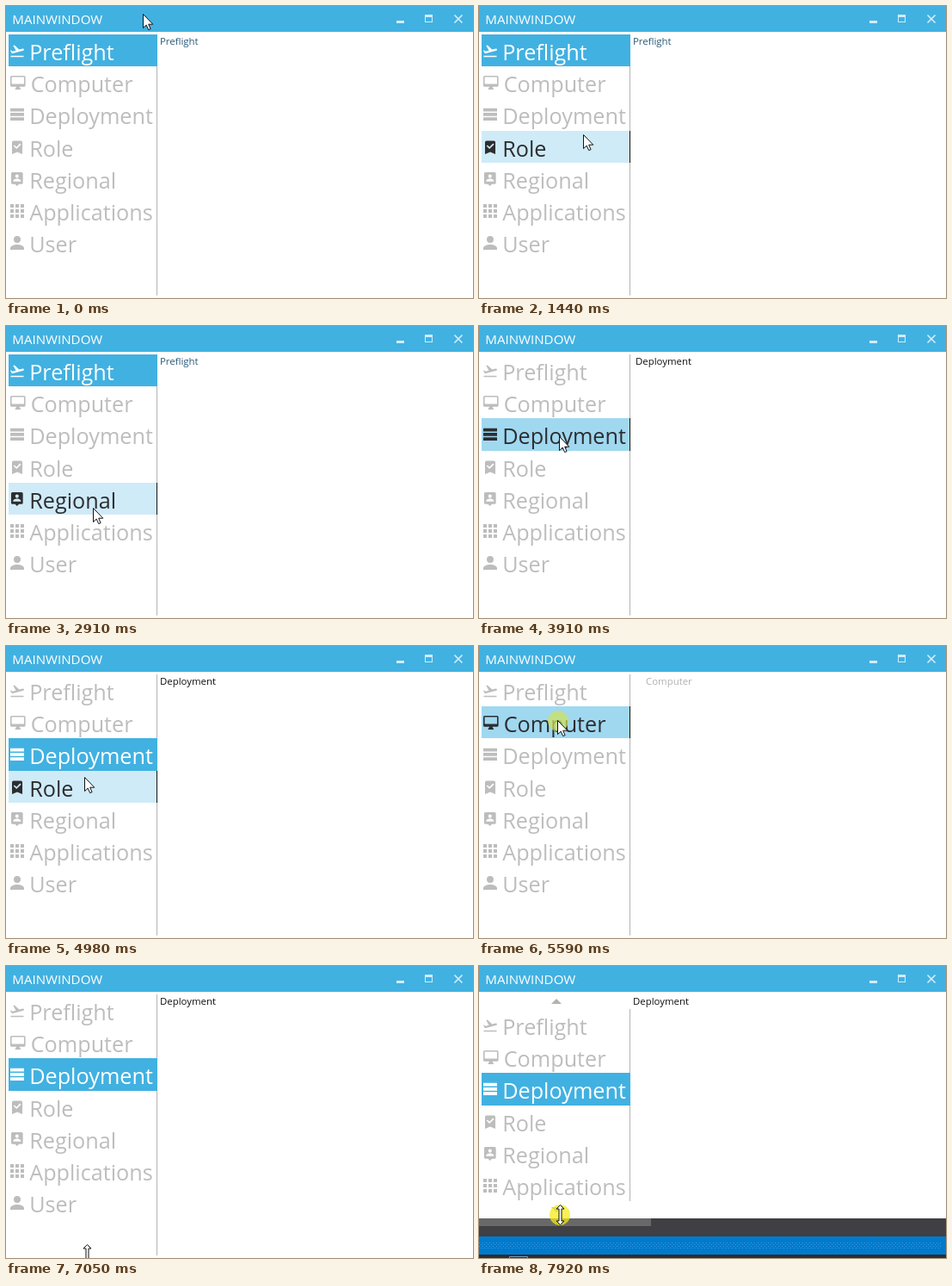
An HTML page for the animation above (7990 ms loop, 543 px wide and 339 px high).

```html
<!DOCTYPE html>
<html lang="en">
<head>
<meta charset="utf-8">
<title>Main window</title>
<style>
  html, body { margin: 0; width: 100%; height: 100%; overflow: hidden; background: #fff; }
  svg { display: block; width: 543px; height: 339px; }
  text { font-family: "Open Sans", "Noto Sans", sans-serif; white-space: pre; }
  rect { shape-rendering: crispEdges; }
  .row { fill: #bdbdbd; font-size: 25.2px; font-weight: 440; }
  .row .back, .row .edge { fill: none; }
  .row.hover { fill: #2d2d30; }
  .row.hover .back { fill: #cfebf7; }
  .row.hover .edge { fill: #111; }
  .row.on { fill: #fff; }
  .row.on .back { fill: #41b1e1; }
  .row.on.hover { fill: #2d2d30; }
  .row.on.hover .back { fill: #a0d8f0; }
  #label { font-size: 11.4px; }
</style>
</head>
<body>
<svg viewBox="0 0 543 339">
  <defs>
    <clipPath id="view"><rect id="viewBox" x="0" y="33" width="180" height="303"/></clipPath>
    <pattern id="grip" width="4" height="4" patternUnits="userSpaceOnUse">
      <path d="M0 1h1v1h-1zM2 3h1v1h-1z" fill="#5fb0e8" opacity=".6"/>
    </pattern>
  </defs>

  <g id="desktop">
    <rect y="290" width="543" height="25" fill="#3f3f44"/>
    <rect y="290" width="200" height="12" fill="#686868"/>
    <rect y="314" width="543" height="21" fill="#007acc"/>
    <rect y="321" width="537" height="7" fill="url(#grip)"/>
    <rect y="335" width="543" height="4" fill="#2d2d30"/>
    <path d="M35.5 339v-1.5h21v1.5" fill="none" stroke="#7d9cc0"/>
  </g>

  <rect id="pane" width="543" height="339" fill="#fff"/>
  <rect width="543" height="30" fill="#41b1e1"/>
  <text x="7.3" y="21" font-size="15.1" fill="#fff">MAINWINDOW</text>
  <g fill="#d3ecf8">
    <rect x="454" y="17" width="9" height="3"/>
    <path d="M487 10h9v9h-9zM488 13v5h7v-5z" fill-rule="evenodd"/>
    <path d="M521.5 10.5l9 9m0-9l-9 9" stroke="#d3ecf8" stroke-width="1.7"/>
  </g>

  <rect id="line" x="175" y="33" width="1" height="303" fill="#b4b4b4"/>
  <g clip-path="url(#view)"><g id="list"></g></g>
  <g id="arrows" fill="#b3b3ab">
    <path d="M84 44l6-6 6 6z"/>
    <path d="M84 280h12l-6 6z"/>
  </g>
  <text id="label" y="45"></text>

  <circle id="press" r="12"/>
  <path id="arrow" d="M-.5-.5V15.6L3.2 12.1 5.7 17.6 8.1 16.6 5.7 11.2H10.8Z" fill="#fff" stroke="#111"/>
  <path id="sizer" d="M0-11.5L4.5-7H1.5V7H4.5L0 11.5-4.5 7H-1.5V-7H-4.5Z" fill="#fff" stroke="#111"/>
</svg>

<script>
const LOOP = 7990, STEP = 77, FIRST = 350, ROW = 37.2, TOP = 33;
const $ = id => document.getElementById(id);

const three = [0, 1, 2];
const bars = three.map(i => `M5 ${11.8 + 5.2 * i}h16v3.8h-16z`).join("");
const grid = three.flatMap(c => three.map(r => `M${5 + 6 * c} ${11 + 6 * r}h4v4h-4z`)).join("");

const items = [
  { name: "Preflight", at: "3.5 9.7", size: .79, icon: "M2.5 19h19v2h-19zM1.8 11.4L3.3 11 5.3 12.6 10.2 11.3 6.1 4.1 8 3.6 14.9 10 20.2 8.6A1.5 1.5 0 0 1 21 11.5L4.4 15.9Z" },
  { name: "Computer", at: "4.2 9.4", size: .8, indent: 1.5, icon: "M21 14H3V4H21ZM21 2H3A2 2 0 0 0 1 4V16A2 2 0 0 0 3 18H10L8 21V22H16V21L14 18H21A2 2 0 0 0 23 16V4A2 2 0 0 0 21 2Z" },
  { name: "Deployment", icon: bars },
  { name: "Role", at: "2.7 9", size: .86, icon: "M17 3A2 2 0 0 1 19 5V21L12 18 5 21V5A2 2 0 0 1 7 3ZM11 14L17.3 7.8 15.8 6.3 11 11.2 8.4 8.6 7 10Z" },
  { name: "Regional", at: "3.7 9.5", size: .76, icon: "M19 2H5A2 2 0 0 0 3 4V18A2 2 0 0 0 5 20H9L12 23 15 20H19A2 2 0 0 0 21 18V4A2 2 0 0 0 19 2ZM12 5.3A2.7 2.7 0 0 1 12 10.7 2.7 2.7 0 0 1 12 5.3ZM18 16H6C6 13 10 12 12 12S18 13 18 16Z" },
  { name: "Applications", icon: grid },
  { name: "User", at: "1 7", icon: "M12 4A4 4 0 0 1 12 12 4 4 0 0 1 12 4ZM12 14C16.4 14 20 15.8 20 18V20H4V18C4 15.8 7.6 14 12 14Z" }
];
const rowTop = i => Math.round(TOP + ROW * i);

$("list").innerHTML = items.map(({ name, at = "0 0", size = 1, indent = 0, icon }, i) => {
  const h = rowTop(i + 1) - rowTop(i);
  return `<g class="row" transform="translate(0 ${rowTop(i)})">
    <rect class="back" x="3" width="173" height="${h}"/>
    <rect class="edge" x="175" width="1" height="${h}"/>
    <path transform="translate(${at}) scale(${size})" fill-rule="evenodd" d="${icon}"/>
    <text x="${27.2 + indent}" y="30">${name}</text></g>`;
}).join("");
const rows = [...document.querySelectorAll(".row")];

// pointer moves: start, end, x, y; it rests in between
const moves = [
  [275, 1420, 122, 149], [1420, 1975, 112, 199], [2060, 2583, 102, 268], [2680, 2890, 102, 212],
  [2890, 3507, 94, 129], [3990, 4354, 93, 160], [4354, 4660, 93, 228], [4660, 4970, 92, 153],
  [4970, 5355, 92, 87], [5830, 6125, 92, 117], [6360, 7040, 94, 335]
];
const clicks = [{ time: 3600, row: 2 }, { time: 5505, row: 1 }, { time: 6253, row: 2 }];

// the screen is refreshed at a steady pace
const snap = t => FIRST + STEP * Math.floor((t - FIRST) / STEP);
const clamp = k => Math.max(0, Math.min(1, k));

function pointer(t) {
  let x = 160, y = 10;
  for (const [start, end, u, v] of moves) {
    const k = clamp((t - start) / (end - start));
    x += (u - x) * k;
    y += (v - y) * k;
  }
  return [Math.round(x), Math.round(y)];
}

const show = (el, on) => el.setAttribute("visibility", on ? "visible" : "hidden");
const move = (el, x, y) => el.setAttribute("transform", `translate(${x} ${y})`);

// a new page slides in from the right while it fades in
function drawLabel(row, age) {
  const label = $("label");
  label.textContent = items[row].name;
  label.setAttribute("x", 179 + Math.round(30 * Math.exp(-age / 122)));
  label.setAttribute("opacity", clamp(age / 250));
  label.setAttribute("fill", row ? "#111" : "#2a5a78");
}

function draw(now) {
  const t = snap(now);
  const drag = clamp((t - 7280) / 609);
  const bottom = Math.round(339 - 46 * drag);
  const scroll = bottom - 36 < ROW * items.length;
  const pad = scroll ? 17 : 0;
  const top = TOP + pad, height = bottom - 3 - pad - top;
  let [x, y] = pointer(t);
  if (drag) y = bottom - 4;

  $("pane").setAttribute("height", bottom);
  for (const id of ["viewBox", "line"]) {
    $(id).setAttribute("y", top);
    $(id).setAttribute("height", height);
  }
  move($("list"), 0, pad);
  show($("arrows"), scroll);

  const sizing = y > 325 || drag > 0;
  const hover = sizing ? -1 : Math.floor((y - TOP) / ROW);
  const { time, row: chosen } = clicks.filter(c => t >= c.time).pop() || { time: -LOOP, row: 0 };
  rows.forEach((row, i) => {
    row.classList.toggle("on", i === chosen);
    row.classList.toggle("hover", i === hover);
  });
  drawLabel(chosen, t - time);

  const press = $("press");
  show(press, drag > 0 || t - time < 150);
  press.setAttribute("fill", drag ? "rgba(244,236,20,.72)" : "rgba(205,226,90,.72)");
  move(press, x, y);
  show($("arrow"), !sizing);
  show($("sizer"), sizing);
  move($("arrow"), x, y);
  move($("sizer"), x + .5, y);
}

const origin = performance.now();
function tick() {
  draw((performance.now() - origin) % LOOP);
  requestAnimationFrame(tick);
}
tick();
</script>
</body>
</html>
```
